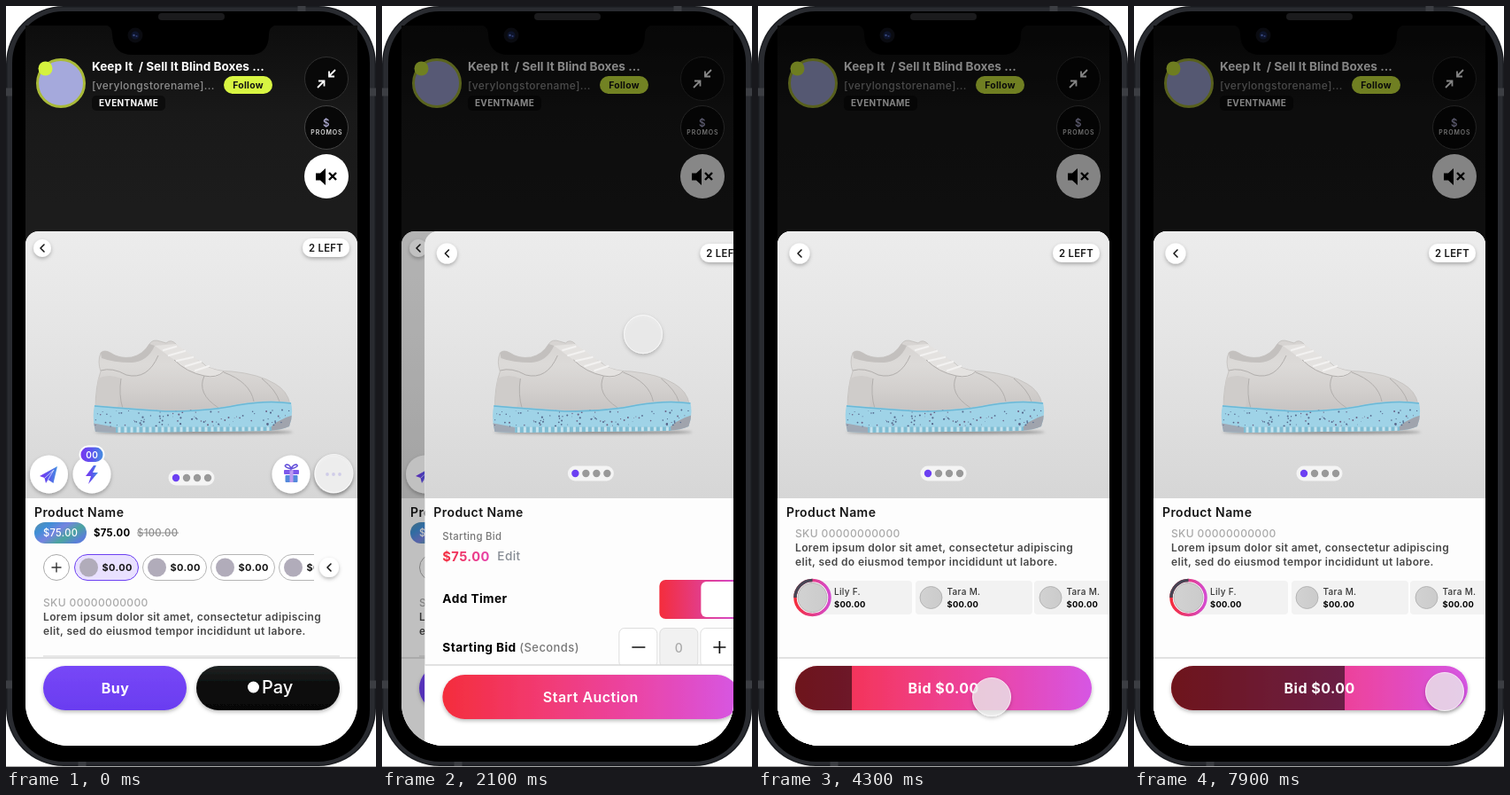
An HTML page for the animation above (8 s loop, 418 px wide and 858 px high).

```html
<!DOCTYPE html>
<html lang="en">
<head>
<meta charset="utf-8">
<title>Auction flow</title>
<style>
html, body { margin: 0; width: 100%; height: 100%; overflow: hidden; background: #fff; }
svg { display: block; width: 418px; height: 858px; }
text { font-family: Inter, Roboto, sans-serif; letter-spacing: .03em; white-space: pre; }
</style>
</head>
<body>
<script>
const text = (x, y, size, weight, fill, str, anchor = 'start', extra = '') =>
  `<text x="${x}" y="${y}" font-size="${size}" font-weight="${weight}" fill="${fill}" text-anchor="${anchor}" ${extra}>${str}</text>`;
const mid = (x, y, size, weight, fill, str, extra) => text(x, y, size, weight, fill, str, 'middle', extra);
const box = (x, y, w, h, r, fill, extra = '') =>
  `<rect x="${x}" y="${y}" width="${w}" height="${h}" rx="${r}" fill="${fill}" ${extra}/>`;
const dot = (x, y, r, fill, extra = '') => `<circle cx="${x}" cy="${y}" r="${r}" fill="${fill}" ${extra}/>`;
const line = (d, color, w = 1, extra = '') =>
  `<path d="${d}" fill="none" stroke="${color}" stroke-width="${w}" ${extra}/>`;
const shape = (d, fill, extra = '') => `<path d="${d}" fill="${fill}" ${extra}/>`;
const gradient = (id, coords, ...colors) =>
  `<linearGradient id="${id}" ${coords}>` + colors.map((c, i) =>
    `<stop offset="${i / (colors.length - 1)}" stop-color="${c}"/>`).join('') + '</linearGradient>';

const soft = 'filter="url(#soft)"';
const round = 'stroke-linecap="round" stroke-linejoin="round"';
const ink = '#161616', violet = '#6c40f2';
const down = 'x1="0" y1="0" x2="0" y2="1"';
const across = 'gradientUnits="userSpaceOnUse" x1="42" y1="0" x2="377" y2="0"';
const screen = 'M22 22H397V786A48 48 0 0 1 349 834H70A48 48 0 0 1 22 786Z';
const sheet = (y = 834) => `M22 ${y}V269A15 15 0 0 1 37 254H382A15 15 0 0 1 397 269V${y}Z`;
const upper = 'M101 455Q101 428 107 412Q103 401 107 391Q111 387 118 391Q128 398 142 396Q155 393 162 381Q166 375 174 378L181 380Q186 375 192 381L195 387Q201 386 204 392L213 399Q221 400 226 406Q238 412 255 412Q286 415 304 426Q318 434 321 449Q270 457 210 458Z';
const sole = 'M100 450Q135 453 180 456Q230 456 262 449Q296 443 322 447Q325 461 320 474Q312 478 296 479L126 481L101 480Q97 464 100 450Z';

const defs = `<defs>
  <filter id="soft" x="-30%" y="-30%" width="160%" height="180%">
    <feDropShadow dx="0" dy="2" stdDeviation="2.2" flood-opacity=".28"/></filter>
  <filter id="blur" x="-10%" y="-200%" width="120%" height="500%"><feGaussianBlur stdDeviation="1.6"/></filter>
  ${gradient('night', down, '#0d0d0d', '#191919', '#1c1c1c', '#1c1c1c')}
  ${gradient('wall', down, '#ececec', '#e6e6e6', '#dfdfdf', '#d6d6d6')}
  ${gradient('hot', across, '#f42d3c', '#f23a72', '#ea45a8', '#d656e4')}
  ${gradient('hotBox', '', '#f42d3c', '#d44bd0')}
  ${gradient('hotText', '', '#f42d3c', '#e642ae')}
  ${gradient('sky', 'x1="0" y1="0" x2="1" y2=".6"', '#5b8fa5', '#3f8fd6', '#7583e0', '#4ba59f', '#5b7fd8')}
  ${gradient('neon', '', '#7a35f0', '#5b55ee', '#4593df')}
  ${gradient('buy', down, '#7747f7', '#6a3df0')}
  ${gradient('black', down, '#202423', '#090909', '#060606')}
  ${gradient('upper', down, '#d6d3d1', '#dcdad8', '#d3d0ce', '#c6c3c2')}
  ${gradient('silver', '', '#d2d2d2', '#cbcbcb')}
  <clipPath id="screen"><path d="${screen}"/></clipPath>
  <clipPath id="chips"><rect x="30" y="610" width="318" height="50"/></clipPath>
  <clipPath id="pill"><rect x="42" y="744" width="335" height="50" rx="25"/></clipPath>
  <clipPath id="sole"><path d="${sole}"/></clipPath>
</defs>`;

function shoe() {
  let seed = 7, specks = '', treads = '';
  const rnd = () => (seed = seed * 16807 % 2147483647) / 2147483647;
  for (let i = 0; i < 95; i++)
    specks += dot((101 + rnd() * 220).toFixed(1), (455 + rnd() * 19).toFixed(1), (.4 + rnd() * .7).toFixed(1),
      i % 3 ? '#54688c' : '#6b6285');
  for (let x = 128; x < 300; x += 7) treads += `M${x} 474.5v7`;
  return `<ellipse cx="212" cy="480.5" rx="112" ry="2.5" fill="#666" opacity=".6" filter="url(#blur)"/>
  ${shape(upper, 'url(#upper)', 'stroke="#bdbab8" stroke-width=".7"')}
  ${shape('M107 391Q111 387 118 391Q128 398 142 396Q155 393 162 381L168 383Q160 401 142 402Q121 402 108 397Z', '#c3c0be')}
  ${shape('M104 420Q116 414 130 420L126 454L101 452Z', '#cfccca')}
  ${shape('M168 383L192 381L226 406Q236 411 246 412Q238 422 224 417Q204 412 190 399Z', '#e4e2e0')}
  ${line('M107 411Q120 407 136 416Q160 422 172 394M130 420Q127 438 132 454M190 399Q204 413 224 417Q238 420 246 412M224 417Q215 437 240 453M246 413Q276 424 280 446M289 420Q305 433 309 446', '#b1aeac', 1)}
  ${line('M178 388L192 384M184 394L202 389M193 400L211 396M203 406L220 401M214 411L229 406', '#f3f2f1', 2.3, round)}
  ${shape(sole, '#9fd3e7')}
  <g clip-path="url(#sole)">
    ${shape('M292 484Q302 467 325 461V484Z', '#a0a4ad')}${shape('M97 470L124 475V484H97Z', '#a0a9b5')}
    ${specks}${line('M124 478H300', '#7fbdd3', 7)}${line(treads, '#c6e3ee', 3)}
  </g>
  ${line('M100 451Q135 454 180 457Q230 457 262 450Q296 444 322 448', '#6bb8d6', 1.5)}`;
}

const pager = y => box(183.5, y - 8.5, 52, 17, 8.5, '#f4f4f4') +
  [0, 1, 2, 3].map(i => dot(192 + i * 12, y, 4.2, i ? '#999' : violet)).join('');
const back = (x, y, r) => dot(x, y, r, '#fff', soft) + line(`M${x + 2} ${y - 4}l-4 4l4 4`, ink, 1.6, round);
const stock = (x, y) => box(x, y, 53, 21, 10.5, '#fff', soft) + mid(x + 26.5, y + 15, 11.3, 600, ink, '2 LEFT');
const button = x => dot(x, 528, 21.5, '#fff', soft);
const details = y => text(42, y, 12, 500, '#a9a9a9', 'SKU 00000000000') +
  text(42, y + 16, 12, 600, '#484848', 'Lorem ipsum dolor sit amet, consectetur adipiscing') +
  text(42, y + 32, 12, 600, '#484848', 'elit, sed do eiusmod tempor incididunt ut labore.');
const product = text(32, 576, 14, 600, ink, 'Product Name');
const footer = y => box(22, y, 375, 120, 0, '#fff') + line(`M22 ${y}H397`, '#d9d9d9', 1.5);

const phone = box(0, 0, 418, 857, 65, '#1a1c20') + box(1.5, 1.5, 415, 854, 63.5, '#292b30') +
  line('M0 97H8M410 97H418M0 765H8M410 765H418M334 0V7M86 850V858', '#3c3e43', 9) +
  box(7, 6, 404, 846, 58, '#000') +
  line('M0 857.5H418', '#aaa', 1);
const notch = shape('M112 21Q120 23 120 32Q121 55 143 55H275Q297 55 297 32Q297 23 306 21Z', '#000') +
  box(172, 8, 75, 8, 4, '#1b1b1d') + dot(146, 33, 8.5, '#0a0b10') + dot(146, 33, 4.5, '#0d142b') +
  dot(144.5, 33, 1.2, '#394a80') + dot(147.5, 34, 1.1, '#303b6d');

const header = box(22, 22, 375, 300, 0, 'url(#night)') +
  dot(62, 87, 26.5, '#a5a9dc', 'stroke="#a9ba38" stroke-width="3"') + dot(44.5, 70.5, 8, '#d4f23e') +
  text(97, 73, 13.6, 700, '#fff', 'Keep It\u00a0 / Sell It Blind Boxes ...', 'start', 'style="letter-spacing:0"') +
  text(97, 94, 12, 500, '#8d8d8d', '[verylongstorename]...') +
  box(246, 79, 55, 20, 10, '#d8f542') + mid(273.5, 93, 10.4, 700, '#111', 'Follow') +
  box(97, 101, 83, 17, 5, '#0c0c0c') + text(105, 113.3, 10, 700, '#fff', 'EVENTNAME') +
  dot(362, 82, 24.5, '#080808', 'stroke="#303030"') + dot(362, 137, 24.5, '#080808', 'stroke="#444"') +
  line('M372 72L364.5 79.5M365 73.5V79.5H371M352 92L359.5 84.5M353 84.5H359.5V90.5', '#fff', 1.8) +
  mid(362, 136, 11.5, 500, '#b9b6df', '$') +
  mid(362.4, 145, 7, 600, '#d8d8d8', 'PROMOS', 'style="letter-spacing:.9px"') +
  dot(362, 192, 25, '#fff') + shape('M350 188.5h5l6-5.5v19l-6-5.5h-5z', '#000') +
  line('M365 188l8 8m0-8l-8 8', '#000', 2.4);

const chip = (x, on) => box(x, 618.5, 72, 29, 14.5, on ? '#e9e1ff' : '#fff', `stroke="${on ? violet : '#b5b5b5'}"`) +
  dot(x + 16, 633, 10.5, '#b1acba') + text(x + 31, 637, 11, 700, ink, '$0.00');

const shop = shape(sheet(), '#fdfdfd') + shape(sheet(555), 'url(#wall)') + shoe() +
  back(41, 273, 10) + stock(335, 262) + pager(532) + [48.5, 97, 322, 370].map(button).join('') +
  shape('M38 530L58 519L53.5 538L47.5 534L45 538L43.5 532Z', 'url(#neon)') +
  line('M44 532L54 523L47.5 534', '#cfd5ff', .9) +
  shape('M99 518L90 530H96L93 539L104 526H98L102 518Z', 'url(#neon)') +
  box(83.5, 496.5, 27, 18.5, 9.2, 'url(#neon)', 'stroke="#fff" stroke-width="2"') +
  mid(97.2, 509.5, 10, 600, '#fff', '00') +
  box(314, 523, 17, 5, 1, '#7d59eb') + box(315.5, 529, 14, 8, 1, '#5489dc') +
  box(320.5, 523, 4, 14, 0, '#bd9af0') +
  line('M322 522Q312 519 317 517Q321 517 322 522Q324 517 328 517Q332 519 322 522', '#6450da', 1.6) +
  [363, 370, 377].map(x => dot(x, 528, 1.9, '#6757e6')).join('') +
  product + box(32, 582, 59, 24, 12, 'url(#sky)') + text(42, 598, 11.1, 500, '#fff', '$75.00') +
  text(99, 598, 11.3, 700, '#000', '$75.00') + text(148, 598, 11.3, 500, '#8c8c8c', '$100.00') +
  line('M148 594H195', '#8c8c8c') +
  `<g clip-path="url(#chips)">${dot(57, 633, 14.5, '#fff', 'stroke="#aaa"')}${line('M51.5 633h11m-5.5-5.5v11', '#333', 1.4)}
   ${[77.5, 154.5, 231.5, 308.5].map((x, i) => chip(x, !i)).join('')}</g>` +
  back(365, 633, 11) + details(677) + line('M42 733H377', '#e2e2e2', 1.5) + footer(735) +
  box(42, 744, 162, 50, 25, 'url(#buy)', soft) + mid(123.5, 775, 16, 700, '#fff', 'Buy') +
  box(215, 744, 162, 50, 25, 'url(#black)', soft) + dot(279.5, 768, 6.5, '#fff') +
  text(289, 775, 20, 500, '#fff', 'Pay', 'start', 'style="letter-spacing:0"');

const menu = box(233, 353, 154, 143, 8, '#fdfdfd', soft) + line('M233 388.5H387M233 424.5H387M233 460.5H387', '#ddd') +
  ['Auction', 'Giveaway', 'Gift', 'Remove from show'].map((s, i) => text(243, 375 + i * 36, 12.2, 600, '#111', s)).join('');

const stepBox = (x, fill) => box(x, 701.5, 43, 44, 6, fill, 'stroke="#ddd"');
const setup = product + text(42, 602, 11.3, 500, '#777', 'Starting Bid') +
  text(42, 626, 14.6, 700, 'url(#hotText)', '$75.00') + text(104, 625, 13.6, 500, '#858b93', 'Edit') +
  text(42, 673, 13.7, 700, '#000', 'Add Timer') +
  box(287, 647, 90, 44, 7, 'url(#hotBox)') + box(334, 649, 41.5, 40, 6, '#fff') +
  text(42, 728, 13.7, 700, '#000', 'Starting Bid <tspan font-size="13" font-weight="500" fill="#777">(Seconds)</tspan>') +
  stepBox(241.5, '#fff') + stepBox(287.5, '#f1f1f1') + stepBox(333.5, '#fff') +
  line('M256 723H271M348 723h14m-7-7v14', '#111', 1.7) + mid(309, 729, 14, 500, '#aaa', '0') +
  footer(743) + box(42, 754, 335, 50, 25, 'url(#hot)', soft) + mid(209.5, 785, 16, 600, '#fff', 'Start Auction');

const bidder = (x, name, r, tx) => dot(x, 667, r, 'url(#silver)', 'stroke="#aaa" stroke-width=".8"') +
  text(tx, 664, 10, 500, '#333', name) + text(tx, 678, 9.4, 700, '#000', '$00.00');
const bidding = box(22, 555, 375, 280, 0, '#fdfdfd') + product + details(599) +
  box(60, 648, 114, 38, 4, '#f2f2f2') + box(178, 648, 132, 38, 4, '#f2f2f2') + box(312, 648, 90, 38, 4, '#f2f2f2') +
  dot(61.5, 667, 19.5, '#fff', 'stroke="url(#hotBox)" stroke-width="3.5"') +
  line('M42 667A19.5 19.5 0 0 1 61.5 647.5', '#474554', 3.5) +
  bidder(61.5, 'Lily F.', 16.5, 86) + bidder(195.5, 'Tara M.', 12.5, 213.5) + bidder(330.5, 'Tara M.', 12.5, 348.5) +
  footer(735) + box(42, 744, 335, 50, 25, 'url(#hot)', soft) +
  `<rect id="bar" x="42" y="744" height="50" fill="#000" opacity=".55" clip-path="url(#pill)"/>` +
  mid(209.7, 775, 16, 700, '#fff', 'Bid $0.00');

document.body.innerHTML = `<svg viewBox="0 0 418 858">${defs}${phone}
<g clip-path="url(#screen)">
  ${header}
  <rect id="dim" x="22" y="22" width="375" height="812"/>
  ${shop}
  <g id="menu">${menu}</g>
  <rect id="shade" x="22" y="22" width="375" height="812"/>
  <g id="auction">
    ${shape(sheet(), '#fdfdfd')}${shape(sheet(555), 'url(#wall)')}${shoe()}
    ${back(47, 279, 11.5)}${stock(333, 268)}${pager(527)}
    ${setup}<g id="bidding">${bidding}</g>
  </g>
</g>${notch}
<g id="cursor">${dot(0, 0, 21.5, '#efefef', 'fill-opacity=".76" stroke="#fff" stroke-opacity=".75" ' + soft)}</g>
</svg>`;

const $ = id => document.getElementById(id);
const linear = u => u;
const smooth = u => u * u * (3 - 2 * u);
// cubic-bezier(0, 0, .58, 1)
const easeOut = u => {
  let lo = 0, hi = 1;
  for (let i = 0; i < 20; i++) {
    const s = (lo + hi) / 2;
    if (1.74 * s * s * (1 - s) + s ** 3 < u) lo = s; else hi = s;
  }
  return smooth(lo);
};

// Value at time t along [time, value] stops
function along(t, ease, ...stops) {
  if (t <= stops[0][0]) return stops[0][1];
  for (let i = 1; i < stops.length; i++) {
    const [t0, a] = stops[i - 1], [t1, b] = stops[i];
    if (t < t1) return a + (b - a) * ease((t - t0) / (t1 - t0));
  }
  return stops[stops.length - 1][1];
}

function draw(t) {
  const open = along(t, easeOut, [50, 0], [500, 1]);
  const slide = along(t, easeOut, [1700, 375], [2210, 0]);
  const x = along(t, smooth, [800, 370.5], [1450, 295], [2250, 295], [2850, 266], [3500, 266], [4000, 264], [4400, 264], [5100, 351]);
  const y = along(t, smooth, [800, 527], [1450, 371], [2250, 370], [2850, 798], [3500, 798], [4000, 779], [4400, 779], [5100, 773]);
  $('dim').setAttribute('opacity', .3 * open);
  $('menu').setAttribute('opacity', open);
  $('shade').setAttribute('opacity', .26 * (1 - slide / 375));
  $('auction').setAttribute('transform', `translate(${slide} 0)`);
  $('bidding').setAttribute('opacity', along(t, easeOut, [3450, 0], [3800, 1]));
  $('bar').setAttribute('width', along(t, linear, [3450, 29], [4300, 64], [6400, 143], [7900, 196], [8000, 199]));
  $('cursor').setAttribute('transform', `translate(${x} ${y})`);
}

const start = performance.now();
function tick() {
  draw((performance.now() - start) % 8000);
  requestAnimationFrame(tick);
}
tick();
</script>
</body>
</html>
```
